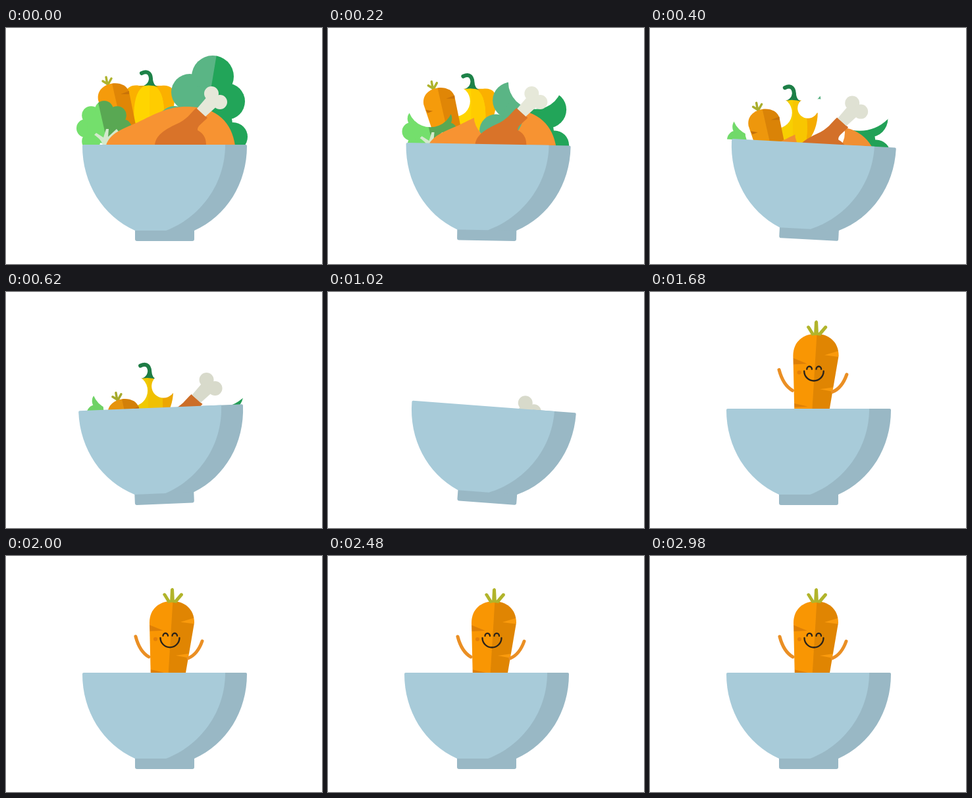
These frames come from a looping animation (480x360 px, 3000 ms). An HTML page with a canvas:

```html
<!DOCTYPE html>
<html lang="en">
<head>
<meta charset="utf-8">
<title>Food bowl</title>
<style>
html, body { margin: 0; width: 100%; height: 100%; overflow: hidden; background: #fff; }
canvas { display: block; width: 480px; height: 360px; }
</style>
</head>
<body>
<canvas id="stage" width="480" height="360"></canvas>
<script>
const LOOP = 3000, W = 480, H = 360, RIM = 178, FLOOR = 325, EATEN = 1300;
const stage = document.getElementById('stage').getContext('2d');
const layer = document.createElement('canvas');
layer.width = W;
layer.height = H;
const c = layer.getContext('2d');

function smooth(t, from, to) {
  const u = Math.min(1, Math.max(0, (t - from) / (to - from)));
  return u * u * (3 - 2 * u);
}

function shape(g, color, d) {
  g.fillStyle = color;
  g.fill(new Path2D(d));
}

function line(color, width, d) {
  c.strokeStyle = color;
  c.lineWidth = width;
  c.lineCap = 'round';
  c.stroke(new Path2D(d));
}

function dot(color, x, y, r) {
  c.fillStyle = color;
  c.beginPath();
  c.arc(x, y, r, 0, 7);
  c.fill();
}

// Recolour what is already painted, inside a path
function shade(color, d) {
  c.globalCompositeOperation = 'source-atop';
  shape(c, color, d);
  c.globalCompositeOperation = 'source-over';
}

function tint(rgb, alpha) {
  c.globalCompositeOperation = 'source-atop';
  c.fillStyle = `rgba(${rgb},${alpha})`;
  c.fillRect(0, 0, W, H);
}

function lettuce() {
  const green = '#5ab585';
  dot(green, 314, 74, 32);
  dot(green, 279, 98, 28);
  dot(green, 335, 112, 28);
  dot(green, 345, 166, 22);
  dot(green, 256, 144, 25);
  shape(c, green, 'M285 90L335 85L350 185H255L270 110Z');
  shade('#22a559', 'M320 40L296 185H380V40Z');
}

function pepper() {
  const green = '#1d8248';
  shape(c, '#fbb000', 'M198 150C186 140 180 118 181 102C182 90 192 86 202 88H236C248 86 257 92 256 106C256 125 250 140 240 152Z');
  shape(c, '#ffd500', 'M196 153C192 128 194 86 218 87C242 87 242 130 238 153Z');
  shape(c, '#ffcc00', 'M218 87C242 87 242 130 238 153H218Z');
  shape(c, green, 'M201 90C211 89 216 85 217 78H223C224 85 226 88 232 90Q217 85 201 90Z');
  line(green, 6, 'M220 82C221 70 216 64 206 69');
}

function carrot() {
  line('#aeb32d', 3.5, 'M154 86L152 75M155 86L147 81M155 86L160 77');
  shape(c, '#f59b0b', 'M140 110C135 82 181 75 187 98L202 172L178 190L155 155Z');
  shade('#e08606', 'M160 80L186 195H220V80Z');
  shape(c, '#c97308', 'M174 101L187 96V101ZM143 118L154 120L146 123Z');
}

function broccoli() {
  const green = '#74df6c';
  for (let i = -1; i <= 5; i++) {
    const a = Math.PI * (1 + i / 4);
    dot(green, 149 + 28 * Math.cos(a), 153 + 28 * Math.sin(a), 14);
  }
  dot(green, 149, 150, 26);
  shade('#59a853', 'M138 105L155 180H200V105Z');
  shape(c, '#d3e9cc', 'M147 180C146 172 141 168 134 163L137 160L148 167L152 154H156L155 166L168 154L171 158L158 170L157 180Z');
}

function roast() {
  shape(c, '#f79332', 'M152 179C158 160 177 154 200 144C228 130 248 119 278 120C322 121 343 145 348 179V190H152Z');
}

function drumstick() {
  const bone = '#e6e8d9';
  shape(c, '#d97329', 'M226 179C227 164 241 155 258 147C275 140 280 130 289 122L306 137C299 145 290 149 291 156C302 162 304 170 304 179V200H226Z');
  shape(c, bone, 'M290 123L307 103L323 117L303 135Z');
  dot(bone, 312, 100, 11);
  dot(bone, 325, 113, 11);
}

// Drift and sink in px per second; sinking begins after delay.
// Each bite is x, y, radius, start time.
const foods = [
  { draw: pepper, drift: -3, sink: 97, delay: 172,
    bites: [[193, 107, 24, 20], [241, 100, 18, 300], [256, 90, 20, 300], [215, 78, 40, 780]] },
  { draw: lettuce, drift: -4, sink: 78, delay: 60,
    bites: [[316, 70, 42, 20], [320, 70, 64, 260], [258, 125, 46, 260]] },
  { draw: carrot, drift: 24, sink: 180, delay: 183, bites: [] },
  { draw: broccoli, drift: 25, sink: 70, delay: 150,
    bites: [[150, 112, 35, 20], [172, 140, 40, 260]] },
  { draw: roast, drift: -5, sink: 140, delay: 190, bites: [[260, 130, 38, 20]] },
  { draw: drumstick, drift: -12, sink: 88, delay: 235, bites: [] }
];

function food(f, t) {
  c.globalCompositeOperation = 'source-over';
  c.clearRect(0, 0, W, H);
  c.save();
  c.translate(f.drift * t / 1000, f.sink * Math.max(0, t - f.delay) / 1000);
  f.draw();
  c.globalCompositeOperation = 'destination-out';
  for (const [x, y, r, start] of f.bites) {
    if (t > start) dot('#000', x, y, r * (1 - Math.exp((start - t) / 50)));
  }
  c.restore();
  tint('40,45,30', 0.07 * smooth(t, 200, 620));
  stage.drawImage(layer, 0, 0);
}

function hero(t) {
  const u = Math.max(0, t - 1370) / 1000;
  const s = 1 - Math.exp(-10.3 * u) * Math.cos(6.5 * u);
  c.globalCompositeOperation = 'source-over';
  c.clearRect(0, 0, W, H);
  c.save();
  c.translate(251.5, 367);
  c.scale(s, s);
  c.translate(-251.5, -367);
  shape(c, '#f99603', 'M218 102C218 80 234 69 252 69C270 69 286 80 286 102L271 190H220Z');
  shade('#e08502', 'M254 60L246 190H300V60Z');
  shade('#de7f05', 'M217 105L239 114L217 115ZM218 173L240 178L219 179Z');
  shade('#fa9a0c', 'M265 101L288 94V104ZM258 152L279 149V156Z');
  line('#ea8f24', 5, 'M197 123Q203 146 217 154M298 130Q291 150 277 156');
  shape(c, '#b1b42b', 'M249 71L250 51Q253 47 255 51L256 71ZM246 72L238 59Q240 55 243 58L251 71ZM253 71L265 57Q269 56 269 60L259 72Z');
  dot('#e47f08', 227, 127, 3);
  line('#29221a', 2.3, 'M234.5 125A14.5 14.5 0 0 0 263.5 125M238.5 122A3.7 4 0 0 1 246 122M252.5 122A3.7 4 0 0 1 260 122');
  c.restore();
  tint('184,143,72', 1 - smooth(t, 1460, 1600));
  stage.drawImage(layer, 0, 0);
}

function bowl() {
  const dark = '#99b8c5';
  shape(stage, dark, 'M196 306H286V322Q286 325 283 325H199Q196 325 196 322Z');
  shape(stage, dark, 'M300 178H364Q366 178 366 180C366 237 335 287 286 309H230Z');
  shape(stage, '#a8cbd9', 'M118 178H333C333 240 293 290 243 309H196C147 287 116 237 116 180Q116 178 118 178Z');
}

// Rocking angle in degrees: a slightly slowing swing that fades in and out
function rock(t) {
  const u = (t - 164) / 1000;
  const swing = Math.cos(Math.PI * (7.5 * u - 0.5 * u * u));
  return 4.4 * swing * smooth(t, 0, 120) * (1 - smooth(t, 1040, EATEN));
}

// Tip over the foot corner on the side of the lean
function tip(angle) {
  const pivot = angle > 0 ? 286 : 196;
  stage.translate(pivot, FLOOR);
  stage.rotate(angle * Math.PI / 180);
  stage.translate(-pivot, -FLOOR);
}

function paint(t) {
  const angle = rock(t);
  stage.fillStyle = '#fff';
  stage.fillRect(0, 0, W, H);

  stage.save();
  tip(angle);
  stage.beginPath();
  stage.rect(-W, -H, 3 * W, H + RIM + 1);
  stage.clip();
  stage.resetTransform();
  if (t < EATEN) foods.forEach(f => food(f, t));
  else hero(t);
  stage.restore();

  stage.save();
  tip(angle);
  bowl();
  stage.restore();
}

const start = performance.now();
function frame() {
  paint((performance.now() - start) % LOOP);
  requestAnimationFrame(frame);
}
frame();
</script>
</body>
</html>
```
